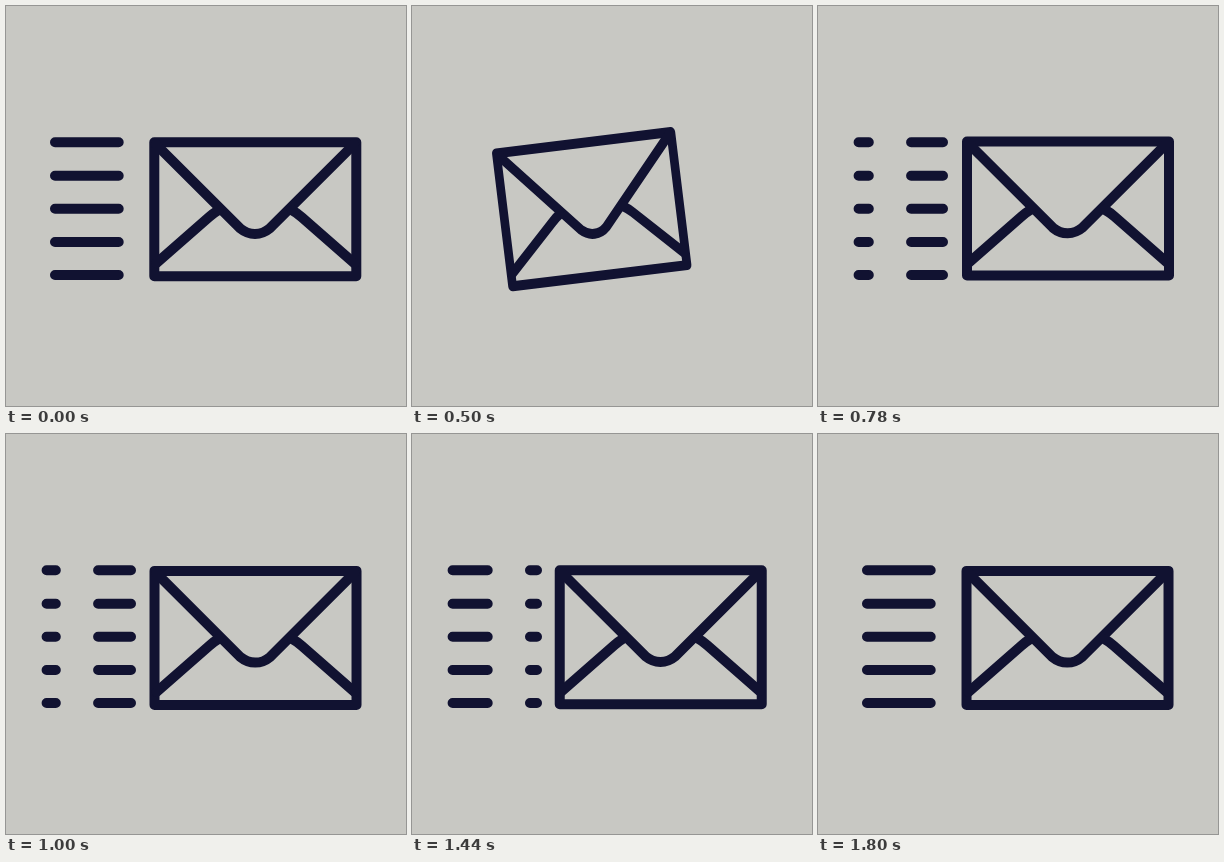
Recreate the animation shown at these times as an HTML page. Size 400 by 400 pixels, loop 1820 ms.

```html
<!DOCTYPE html>
<html lang="en">
<head>
<meta charset="utf-8">
<title>Mail on its way</title>
<style>
html, body { margin: 0; width: 100%; height: 100%; overflow: hidden; background: #c8c8c3; }
svg { display: block; width: 100vw; height: 100vh; }
path { fill: none; stroke: #111231; stroke-width: 10; stroke-linecap: round; stroke-linejoin: round; }
</style>
</head>
<body>
<svg viewBox="0 0 400 400">
  <path id="lines"/>
  <g id="mail">
    <path d="M-101-67H101V67H-101Z"/>
    <path d="M-99.5-65L-15 19.3Q-8.5 24.7-.3 24.7T14.3 19.3L98.8-65"/>
    <path d="M-99 54L-46.5 8Q-42 4-37 1M99 54L46.5 8Q42 4 36.5 1"/>
  </g>
</svg>
<script>
const LOOP = 1820, STEP = 20;
const LEFT = 40.6, RIGHT = 125, DASH = 63.7, PERIOD = 106, REST = 49;
const LAUNCH = 545, STOP = 1713;
const rows = [136.3, 169.7, 202.7, 236, 269];
const lines = document.getElementById('lines');
const mail = document.getElementById('mail');

const smooth = (from, to, t) => {
  const p = Math.min(1, Math.max(0, (t - from) / (to - from)));
  return p * p * (3 - 2 * p);
};

// Distance the dashes still have to travel before they rest
const remaining = t => 69 * (Math.max(0, STOP - t) / 273) ** 1.724;

function dashes(t) {
  if (t < LAUNCH) {
    const end = REST + DASH * (1 - smooth(0, 140, t));
    return end > REST ? [[REST, end]] : [];
  }
  const left = remaining(t);
  const low = Math.max(LEFT, RIGHT - remaining(LAUNCH) + left);
  const phase = (REST + left) % PERIOD;
  return [phase - PERIOD, phase, phase + PERIOD]
    .map(x => [Math.max(low, x), Math.min(RIGHT, x + DASH)])
    .filter(([a, b]) => b > a);
}

function draw(t) {
  const pull = smooth(0, 195, t) - smooth(448, 590, t);
  const shake = smooth(540, 600, t);
  const a = (t - 780) / 100 * 2 * Math.PI;
  const x = 249.3 - 100 * pull + shake * 0.7 * Math.cos(a);
  const y = 203.2 + shake * (0.96 * Math.sin(a) - 0.7 * Math.cos(a));
  mail.setAttribute('transform',
    `translate(${x} ${y}) rotate(${-10 * pull}) scale(${1 - 0.187 * pull} 1)`);
  lines.setAttribute('d', dashes(t).map(([from, to]) =>
    rows.map(row => `M${from} ${row}H${to}`).join('')).join(''));
}

const start = performance.now();
function tick() {
  const t = (performance.now() - start) % LOOP;
  draw(Math.floor(t / STEP) * STEP);
  requestAnimationFrame(tick);
}
tick();
</script>
</body>
</html>
```
